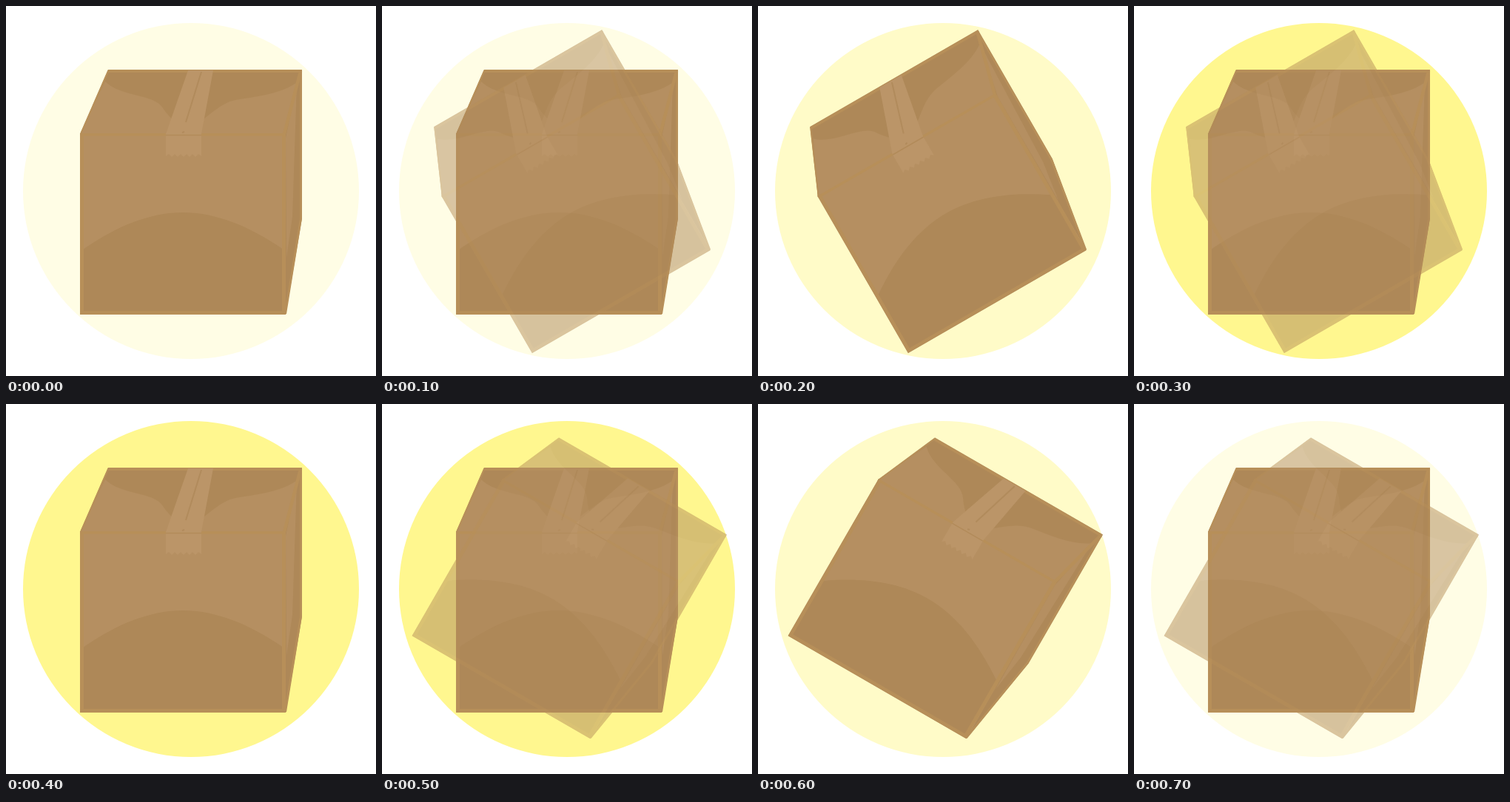
An HTML page for the animation above (0.8 s loop, 500 by 500 pixels).

```html
<!DOCTYPE html>
<html lang="en">
<head>
<meta charset="utf-8">
<title>Rocking box</title>
<style>
  html, body { margin: 0; width: 100%; height: 100%; overflow: hidden; background: #fff; }
  svg { display: block; width: 100vw; height: 100vh; }
  .light { fill: #b58f61; }
  .dark { fill: #ae8858; }
  .tape { fill: #bb9568; }
  .edge { fill: none; stroke: #b78f59; }
</style>
</head>
<body>
<svg viewBox="0 0 500 500">
  <defs>
    <g id="box">
      <!-- right side -->
      <path class="dark" d="M376 172 L400 86 V287 L378 417 Z"/>
      <path class="light" d="M378 178 L393 104 L387 285 L379 340 Z"/>
      <path class="edge" stroke-width="3" d="M398.5 87 V287 L377.5 416"/>
      <!-- lid -->
      <path class="dark" d="M138 86 H400 L376 173 H100 Z"/>
      <path class="light" d="M134 102 C156 124 200 118 212 138 Q220 150 231 158 H260 C280 144 292 129 316 126 C342 122 372 118 392 104 L376 173 H100 Z"/>
      <path class="edge" stroke-width="4" d="M138 88 H400"/>
      <path class="edge" stroke-width="2" d="M138.500 87 L101.500 172"/>
      <path class="edge" stroke-width="4.500" d="M398 88 L376 173"/>
      <!-- front -->
      <path class="light" d="M100 172 H378 V417 H100 Z"/>
      <path class="dark" d="M104 329 C150 297 195 279 239 279 S328 297 375 329 V414 H104 Z"/>
      <path class="edge" stroke-width="5" d="M102.500 172 V414.500 H375.500 V172"/>
      <path class="edge" stroke-width="3.500" d="M100 173.700 H378"/>
      <!-- tape -->
      <path class="tape" d="M246 87 H280 L264 173 V203 L260 200 L256 204 L252 200 L248 204 L244 200 L240 204 L236 200 L232 204 L228 200 L224 204 L220 200 L216 203 V173 Z"/>
      <path fill="none" stroke="#b18b5c" stroke-width="2" d="M264 89 L243 157 M238 171 L241 170"/>
      <path fill="none" stroke="#b28b5a" stroke-width="1.500" d="M216 174.500 H264"/>
    </g>
  </defs>
  <circle id="disc" cx="250" cy="250" r="227"/>
  <use id="upright" href="#box"/>
  <use id="tilted" href="#box"/>
</svg>
<script>
  const STEP = 100;
  const pale = '#fffde5', soft = '#fffbc8', strong = '#fff78f';
  const left = 'translate(-.7 -.6) rotate(-30 250 250)';
  const right = 'translate(4 -6.4) rotate(30 250 250)';

  // disc colour, upright opacity, tilted opacity, tilt
  const steps = [
    [pale, 1, 0, left],
    [pale, 1, .5, left],
    [soft, 0, 1, left],
    [strong, 1, .5, left],
    [strong, 1, 0, left],
    [strong, 1, .5, right],
    [soft, 0, 1, right],
    [pale, 1, .5, right]
  ];

  const [disc, upright, tilted] =
    ['disc', 'upright', 'tilted'].map(id => document.getElementById(id));

  function draw(time) {
    const [colour, base, ghost, tilt] = steps[Math.floor(time / STEP) % steps.length];
    disc.setAttribute('fill', colour);
    upright.setAttribute('opacity', base);
    tilted.setAttribute('opacity', ghost);
    tilted.setAttribute('transform', tilt);
  }

  const start = performance.now();
  function tick() {
    draw(performance.now() - start);
    requestAnimationFrame(tick);
  }
  tick();
</script>
</body>
</html>
```
